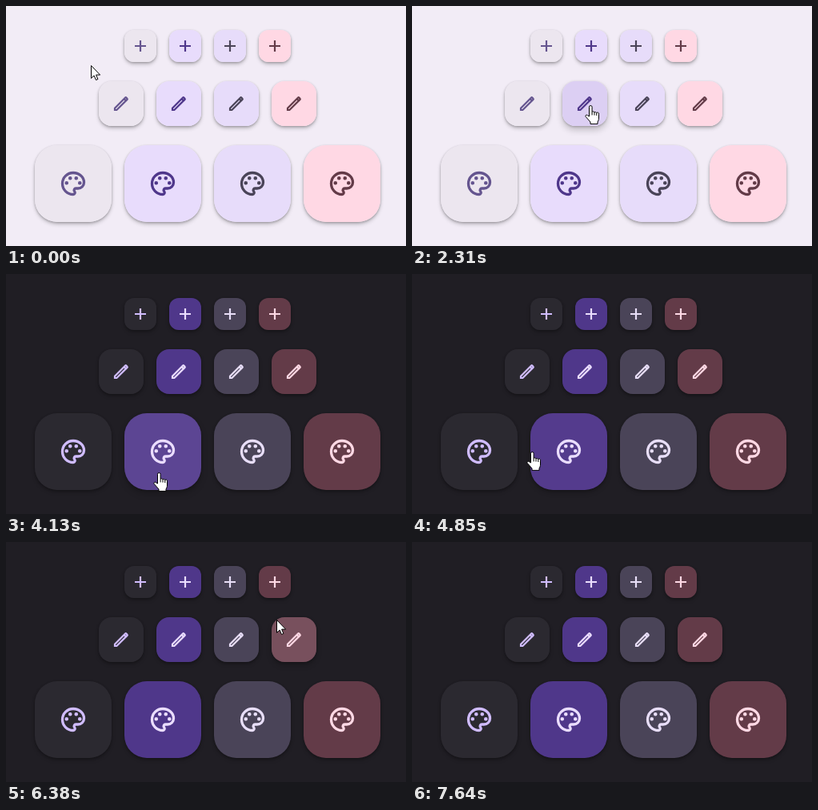
An HTML page that plays this animation: 500x300 px, repeating every 7790 ms.

```html
<!DOCTYPE html>
<html lang="en">
<head>
<meta charset="utf-8">
<title>Floating action buttons</title>
<style>
  html, body { margin: 0; width: 100%; height: 100%; overflow: hidden; }
  body { position: relative; background: #f2ecf6; }
  .fab, .shade { position: absolute; border-radius: var(--r); }
  .fab { overflow: hidden; background: var(--fill); color: var(--ink); }
  .shade {
    --lift: 0;
    box-shadow: 0 1px 3px rgba(0,0,0,.24),
      0 calc(3px + 2px * var(--lift)) calc(5px + 3px * var(--lift)) rgba(0,0,0,.2);
  }
  .fab svg {
    position: absolute; inset: 0; margin: auto;
    fill: none; stroke: currentColor; stroke-width: 2.2;
  }
  .fab .dots { stroke-width: 3.1; stroke-linecap: round; }
  .hover, .ripple { position: absolute; background: currentColor; opacity: 0; }
  .hover { inset: 0; }
  .ripple { border-radius: 50%; }

  .surface   { --fill: #ece6ef; --ink: #65558f; }
  .primary   { --fill: #e8dcfc; --ink: #4f378b; }
  .secondary { --fill: #e7dcfa; --ink: #4a4458; }
  .tertiary  { --fill: #ffd8e4; --ink: #633b48; }

  .dark { background: #201e24; }
  .dark .surface   { --fill: #2b2930; --ink: #d0bcff; }
  .dark .primary   { --fill: #4f378a; --ink: #eaddff; }
  .dark .secondary { --fill: #4a4458; --ink: #e8def8; }
  .dark .tertiary  { --fill: #633b48; --ink: #ffd8e4; }

  #cursor { position: absolute; left: 0; top: 0; overflow: visible; }
  #cursor path { fill: #fff; stroke: #000; stroke-linejoin: round; }
</style>
</head>
<body>
<svg id="cursor" width="20" height="26">
  <path id="arrow" d="M.5.5V16.4L4.1 13 6.5 18.5 8.9 17.5 6.6 12.1H11.6Z"/>
  <g id="hand" transform="translate(-6 -1)">
    <path d="M5.5 14V2.3a1.8 1.8 0 0 1 3.6 0V8.4a1.7 1.7 0 0 1 2.9.6 1.7 1.7 0 0 1 2.8.9 1.5 1.5 0 0 1 2.7 1.3V16c0 2.6-.8 3.6-1.5 5v2.4H7V21L1.2 14.4c-1-1.7.9-3 2.3-1.7Z"/>
    <path d="M9.1 8.4v4M12 9v3.6M14.8 10v3"/>
  </g>
</svg>
<script>
const LOOP = 7790;
const DARK_FROM = 3440;
const HOVER_FADE = 75;
const GAP = 16;
const CENTER = 252;
const ROLES = ['surface', 'primary', 'secondary', 'tertiary'];

const ADD = '<path d="M5 12H19M12 5V19"/>';
const EDIT = '<path d="M4 20V17.6L17.1 4.5a.85.85 0 0 1 1.2 0l1.2 1.2a.85.85 0 0 1 0 1.2L6.4 20ZM15.6 6l2.4 2.4"/>';
const PALETTE = `<path d="M12 21A9 9 0 1 1 12 3c5 0 9 3.6 9 8a5 5 0 0 1-5 5h-1.8a1.5 1.5 0 0 0-1.1 2.5A1.5 1.5 0 0 1 12 21Z"/>
  <path class="dots" d="M6.5 11.5h.01M9.5 7.5h.01M14.5 7.5h.01M17.5 11.5h.01"/>`;

const ROWS = [
  { y: 30, size: 40, r: 12, iconSize: 24, icon: ADD },
  { y: 94, size: 56, r: 16, iconSize: 24, icon: EDIT },
  { y: 174, size: 96, r: 28, iconSize: 36, icon: PALETTE },
];

// One eased stroke of the pointer; bow pushes the middle sideways.
const move = (start, end, x, y, bow = 0) => ({ start, end, x, y, bow });

const VISITS = [
  { enter: 0, leave: 3410, x: 106, y: 74, moves: [
    move(340, 520, 108, 71), move(760, 1170, 165, 52), move(1400, 2170, 201, 118, -15),
    move(2250, 2310, 222, 125), move(2310, 3010, 318, 228), move(3040, 3350, 362, 296),
  ] },
  { enter: 3690, leave: 7640, x: 282, y: 298, moves: [
    move(3690, 4130, 190, 249), move(4290, 5060, 160, 262, 75), move(5090, 5510, 123, 254),
    move(5510, 5890, 338, 144, -50), move(6150, 6380, 338, 97), move(6380, 6660, 286, 53, -10),
    move(6850, 7610, 465, 299, -15),
  ] },
];

const PRESSES = [1900, 2700, 5380, 5890];
const HOLD = 480;

const clamp = v => Math.min(1, Math.max(0, v));
const smooth = u => u * u * (3 - 2 * u);

function pointerAt(t) {
  const visit = VISITS.find(v => t >= v.enter && t < v.leave);
  if (!visit) return null;
  let { x, y } = visit;
  for (const m of visit.moves) {
    if (t < m.start) break;
    const u = smooth(clamp((t - m.start) / (m.end - m.start)));
    const dx = m.x - x, dy = m.y - y;
    const side = m.bow * Math.sin(Math.PI * u) / Math.hypot(dx, dy);
    x += dx * u - dy * side;
    y += dy * u + dx * side;
  }
  return { x, y };
}

function isInside(p, fab) {
  if (!p) return false;
  const half = fab.size / 2, core = half - fab.r;
  const dx = Math.abs(p.x - fab.x - half), dy = Math.abs(p.y - fab.y - half);
  return Math.hypot(Math.max(0, dx - core), Math.max(0, dy - core)) <= fab.r;
}

const cursor = document.getElementById('cursor');
const arrow = document.getElementById('arrow');
const hand = document.getElementById('hand');

function addBox(className, { x, y, size, r }) {
  const box = document.createElement('div');
  box.className = className;
  box.style.cssText = `left:${x}px;top:${y}px;width:${size}px;height:${size}px;--r:${r}px`;
  document.body.insertBefore(box, cursor);
  return box;
}

const fabs = ROWS.flatMap(row => ROLES.map((role, col) => {
  const fab = { ...row, x: CENTER + (col - 2) * (row.size + GAP) + GAP / 2 };
  fab.shade = addBox('shade', fab);
  const box = addBox(`fab ${role}`, fab);
  box.innerHTML = `<div class="hover"></div><div class="ripple"></div>
    <svg width="${row.iconSize}" height="${row.iconSize}" viewBox="0 0 24 24">${row.icon}</svg>`;
  fab.hover = box.querySelector('.hover');
  fab.ripple = box.querySelector('.ripple');
  fab.press = PRESSES.find(start => isInside(pointerAt(start), fab));
  return fab;
}));

function drawRipple(fab, t) {
  const age = t - fab.press;
  const strength = age < 0 ? 0 : 1 - clamp((age - HOLD) / 150);
  fab.ripple.style.opacity = 0.085 * strength;
  const origin = pointerAt(fab.press);
  const grow = 1 - (1 - clamp(age / 225)) ** 2;
  const radius = fab.size * (0.1 + 1.35 * grow);
  Object.assign(fab.ripple.style, {
    left: `${origin.x - fab.x - radius}px`, top: `${origin.y - fab.y - radius}px`,
    width: `${2 * radius}px`, height: `${2 * radius}px`,
  });
}

function draw(t) {
  document.body.classList.toggle('dark', t >= DARK_FROM);
  const p = pointerAt(t);
  // Averaging recent positions gives each hover layer a linear fade.
  const recent = Array.from({ length: 6 }, (_, i) => pointerAt(t - i * HOVER_FADE / 5));
  for (const fab of fabs) {
    const share = recent.filter(q => isInside(q, fab)).length / recent.length;
    fab.hover.style.opacity = 0.08 * share;
    fab.shade.style.setProperty('--lift', share);
    if (fab.press) drawRipple(fab, t);
  }
  cursor.style.display = p ? '' : 'none';
  if (!p) return;
  const over = fabs.some(fab => isInside(p, fab));
  arrow.style.display = over ? 'none' : '';
  hand.style.display = over ? '' : 'none';
  cursor.style.transform = `translate(${Math.round(p.x)}px, ${Math.round(p.y)}px)`;
}

const began = performance.now();
function tick() {
  draw((performance.now() - began) % LOOP);
  requestAnimationFrame(tick);
}
tick();
</script>
</body>
</html>
```
